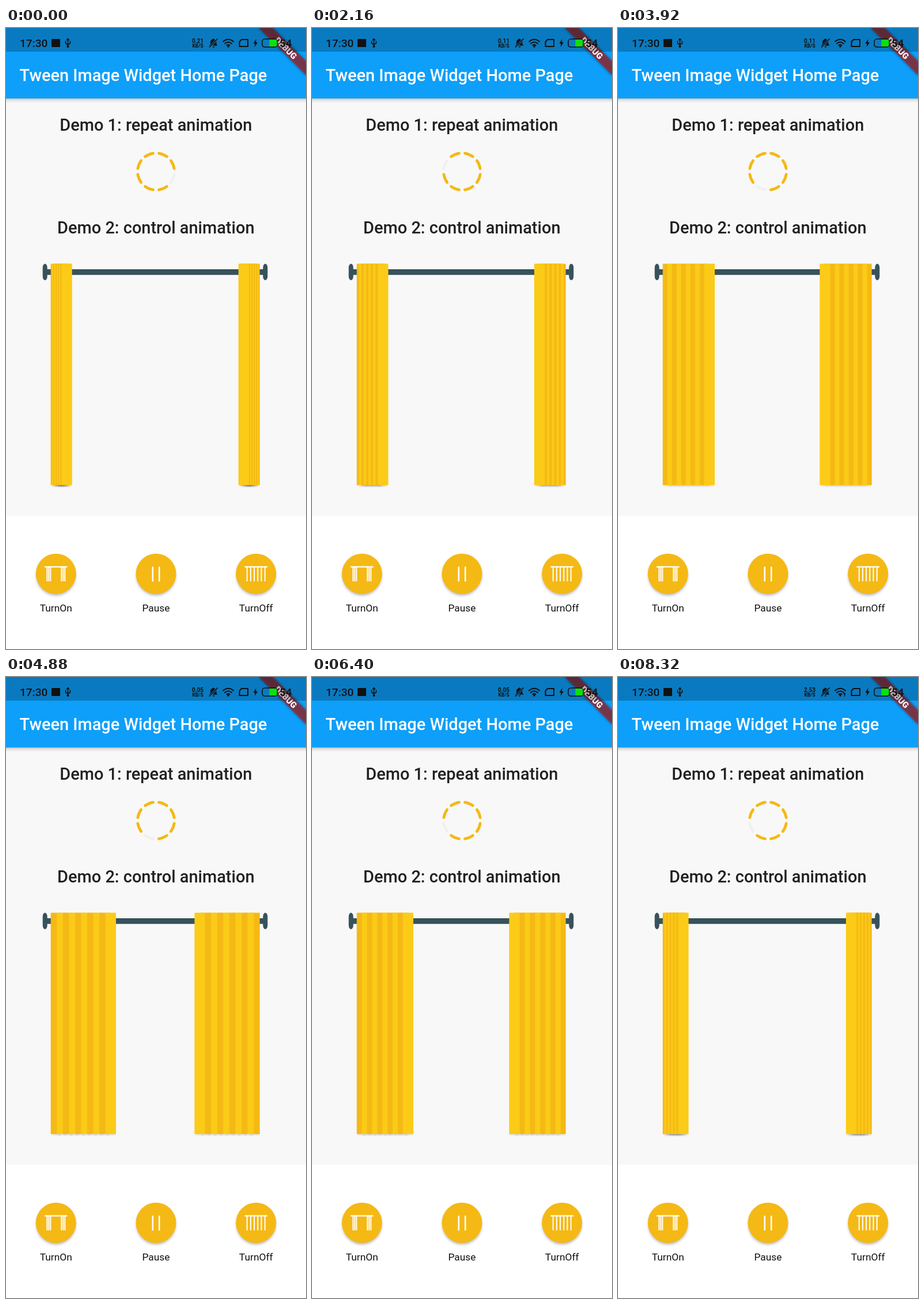
Recreate the animation shown at these times as an HTML page. Size 521 by 1076 pixels, loop 8400 ms.

```html
<!DOCTYPE html>
<html lang="en">
<head>
<meta charset="utf-8">
<title>Curtain</title>
<style>
  html, body { margin: 0; width: 100%; height: 100%; overflow: hidden; background: #fff; }
  svg { display: block; width: 100vw; height: 100vh; }
  text { font-family: Roboto, sans-serif; }
  .title { font-size: 28.94px; font-weight: 500; }
  .mid { text-anchor: middle; }
  .line { fill: none; stroke-linecap: round; stroke-linejoin: round; }
</style>
</head>
<body>
<svg viewBox="0 0 521 1076">
  <defs>
    <filter id="soft" x="-20%" y="-80%" width="140%" height="260%"><feGaussianBlur stdDeviation="1.5"/></filter>
    <filter id="drop" x="-20%" y="-20%" width="140%" height="150%"><feGaussianBlur stdDeviation="2.6"/></filter>
    <filter id="haze"><feGaussianBlur stdDeviation=".6"/></filter>
    <linearGradient id="under" x2="0" y2="1">
      <stop stop-color="#000" stop-opacity=".25"/>
      <stop offset=".4" stop-color="#000" stop-opacity=".08"/>
      <stop offset="1" stop-color="#000" stop-opacity="0"/>
    </linearGradient>
  </defs>

  <rect width="521" height="1076" fill="#fff"/>
  <rect width="521" height="845" fill="#f8f8f8"/>
  <rect y="122" width="521" height="8" fill="url(#under)"/>
  <rect width="521" height="122" fill="#0d9ff9"/>
  <text class="title" x="23.5" y="92" fill="#fff">Tween Image Widget Home Page</text>

  <g transform="translate(521 0) rotate(45)">
    <rect x="-58" y="40.5" width="116" height="17.4" fill="#000" opacity=".4" filter="url(#drop)"/>
    <rect x="-58" y="40.5" width="116" height="17.4" fill="#b71c1c" opacity=".63"/>
    <text class="mid" y="54.5" font-size="14.7" font-weight="900" fill="#fff">DEBUG</text>
  </g>
  <rect width="521" height="41" opacity=".23"/>

  <g id="status" fill="#111">
    <text x="24" y="33" font-size="19" font-weight="500">17:30</text>
    <rect x="79" y="19" width="15" height="14" rx="1"/>
    <g class="line" stroke="#111" stroke-width="1.5">
      <path d="M107.500 20V32M103.500 23V26.500L107.500 29L111.500 26.500V23"/>
      <path d="M105.500 21L107.500 18.500L109.500 21"/>
    </g>
    <circle cx="107.500" cy="32" r="2"/>
    <g class="mid" font-weight="700">
      <text id="rate" class="mid" x="333" y="26" font-size="10"></text>
      <text class="mid" x="333" y="34" font-size="8.500">KB/S</text>
    </g>
    <path d="M353 30.500L355 28V24Q355.500 20 359 19.500Q360 17 361.500 19.500Q365.500 20.500 365.500 24V28L367.500 30.500ZM358 32H363L360.500 34Z"/>
    <path d="M353 34L368 18" stroke="#0a7ac0" stroke-width="3.500"/>
    <path d="M353 33.500L367.500 18.500" stroke="#111" stroke-width="1.700"/>
    <g class="line" stroke="#111" stroke-width="2">
      <path d="M377 23.500Q386 16 395 23.500M380 27Q386 22 392 27M383.500 30Q386 28 388.500 30"/>
      <path d="M409 20H420V32H405.500V24Z"/>
    </g>
    <circle cx="386" cy="32" r="1.800"/>
    <path id="up" d="M391 30L393.500 27L396 30ZM392.800 30H394.200V34H392.800Z"/>
    <path d="M434.500 19L429.500 27H432.500L431.500 33L437 25H434Z"/>
    <rect x="445" y="19" width="26" height="14" rx="4.500" fill="none" stroke="#111" stroke-width="1.600"/>
    <path d="M457.500 20H468Q470.500 20 470.500 23V29Q470.500 32 468 32H457.500Z" fill="#0be010"/>
    <text x="475" y="33" font-size="19" font-weight="500">54</text>
  </g>

  <g class="title" fill="#212121">
    <text class="mid" x="260.300" y="178">Demo 1: repeat animation</text>
    <text class="mid" x="260.300" y="356">Demo 2: control animation</text>
  </g>
  <g id="ring" class="line" stroke-width="4.800" transform="translate(260.500 248.700)" filter="url(#haze)"></g>

  <g fill="#37525b">
    <rect x="68" y="418" width="382" height="9.800"/>
    <rect x="63.700" y="408.500" width="8" height="28.500" rx="4" ry="7"/>
    <rect x="446.300" y="408.500" width="8" height="28.500" rx="4" ry="7"/>
  </g>
  <g id="left" transform="translate(77.700 0)"></g>
  <g id="right" transform="translate(440.700 0) scale(-1 1)"></g>

  <g id="buttons"></g>
  <circle id="tap" cx="444" cy="932" r="15" fill="#fff" fill-opacity=".28" stroke="#fff" stroke-opacity=".12"/>
</svg>
<script>
const LOOP = 8400, STEP = 80;
const GOLD = '#f5b915', LIGHT = '#fbcb17';
const STRIPS = 10, STRIP_W = 18.2;
const RATES = ['0.21', '0.11', '0.05', '2.53'];
// Curtain width over time: [ms, px]
const WIDTHS = [[1600, 37], [2960, 80], [3600, 80], [3920, 90.3], [4640, 113.3],
  [5120, 113.3], [5680, 98.3], [6560, 98.3], [8320, 44.8]];

const $ = id => document.getElementById(id);
function add(parent, tag, attrs) {
  const el = document.createElementNS('http://www.w3.org/2000/svg', tag);
  for (const key in attrs) el.setAttribute(key, attrs[key]);
  parent.appendChild(el);
  return el;
}

const dashes = Array.from({ length: 8 }, (_, i) => {
  const at = deg => {
    const a = (i * 45 + deg) * Math.PI / 180;
    return `${32 * Math.sin(a)} ${-32 * Math.cos(a)}`;
  };
  return add($('ring'), 'path', { d: `M${at(9)}A32 32 0 0 1 ${at(36)}` });
});

function makeCurtain(g) {
  const row = attrs => Array.from({ length: STRIPS }, (_, i) => add(g, 'rect', attrs(i)));
  const shades = row(() => ({ y: 410, width: STRIP_W - 3, height: 384, opacity: .1, filter: 'url(#soft)' }));
  const strips = row(i => ({ y: 408.5, width: STRIP_W, height: 383.5, fill: i % 2 ? LIGHT : GOLD }));
  return width => {
    const pitch = (width - STRIP_W) / (STRIPS - 1);
    strips.forEach((s, i) => {
      s.setAttribute('x', i * pitch);
      shades[i].setAttribute('x', i * pitch + 1.5);
    });
  };
}
const curtains = [makeCurtain($('left')), makeCurtain($('right'))];

function makeButton(x, label, bar, lines) {
  const g = add($('buttons'), 'g', {});
  add(g, 'circle', { cx: x, cy: 949, r: 34, opacity: .3, filter: 'url(#drop)' });
  add(g, 'circle', { cx: x, cy: 945.7, r: 35, fill: GOLD });
  const d = lines.map(dx => `M${x + dx} 934.500V958`).join('');
  add(g, 'path', { d, class: 'line', stroke: '#fff', 'stroke-width': bar ? 2 : 2.6 });
  if (bar) add(g, 'path', { d: `M${x - 19} 933.700H${x + 19}`, class: 'line', stroke: '#fff', 'stroke-width': 2.2 });
  add(g, 'text', { x, y: 1011, class: 'mid', 'font-size': 17.4, fill: '#111' }).textContent = label;
}
makeButton(86.8, 'TurnOn', true, [-15.5, -12.5, -9.5, 9.5, 12.5, 15.5]);
makeButton(260.5, 'Pause', false, [-5.7, 5.7]);
makeButton(434.2, 'TurnOff', true, [-15.5, -9.3, -3.1, 3.1, 9.3, 15.5]);

function track(keys, t) {
  const n = keys.findIndex(k => k[0] > t);
  if (n < 0) return keys[keys.length - 1][1];
  if (n === 0) return keys[0][1];
  const [t0, a] = keys[n - 1], [t1, b] = keys[n];
  return a + (b - a) * (t - t0) / (t1 - t0);
}

function draw(ms) {
  const t = Math.floor(ms % LOOP / STEP) * STEP;
  const gap = Math.floor(2.47 + t / 478 * 8) % 8;
  dashes.forEach((d, i) => d.setAttribute('stroke', i === gap ? '#f0f0f0' : GOLD));

  const width = track(WIDTHS, t);
  curtains.forEach(set => set(width));

  const reading = Math.floor((t + 1300) / 3000);
  $('rate').textContent = RATES[reading];
  $('up').style.display = reading === 3 ? '' : 'none';
  $('tap').style.display = t >= 1440 && t < 1600 ? '' : 'none';
}

const start = performance.now();
function tick() {
  draw(performance.now() - start);
  requestAnimationFrame(tick);
}
draw(0);
requestAnimationFrame(tick);
</script>
</body>
</html>
```
